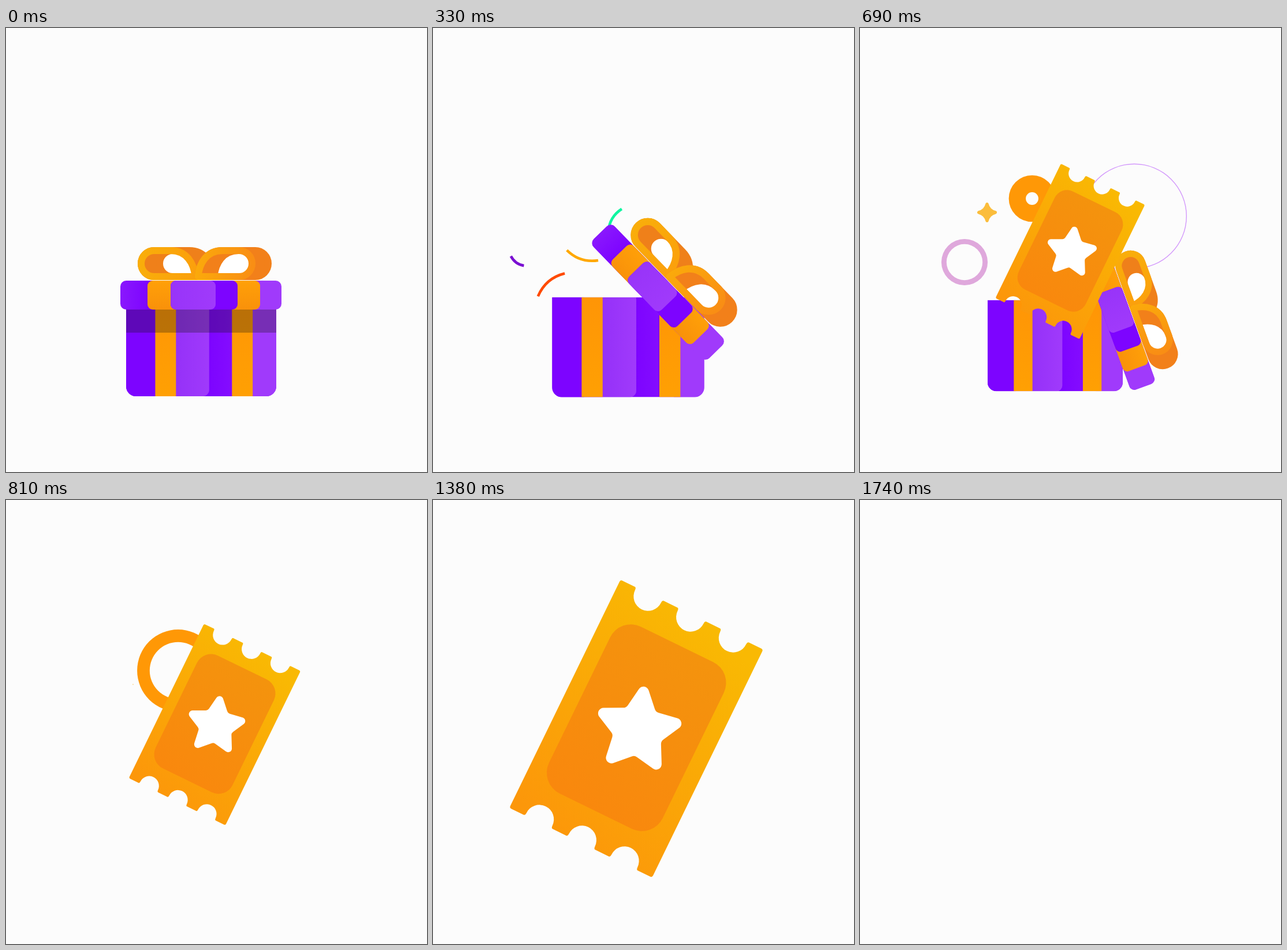
Animation, 729 px wide and 768 px high, one loop 1.8 s. Source, as an HTML page with a canvas:

```html
<!DOCTYPE html>
<html>
<head>
<meta charset="utf-8">
<title>Gift box</title>
<style>
html, body { margin: 0; width: 100%; height: 100%; overflow: hidden; background: #fcfcfc; }
canvas { display: block; }
</style>
</head>
<body>
<canvas id="stage" width="729" height="768"></canvas>
<script>
const ctx = document.getElementById('stage').getContext('2d');
const LOOP = 1800, STEP = 30, TAU = Math.PI * 2, CENTER = 337.5;
const BG = '#fcfcfc', DARK = '#7d04ff', LIGHT = '#a03afb';
const phase = (t, start, span) => Math.max(0, Math.min(1, (t - start) / span));
const easeOut = (p, n = 2) => 1 - Math.pow(1 - p, n);
const rad = deg => deg * Math.PI / 180;

function gradient(x0, y0, x1, y1, a, b) {
  const g = ctx.createLinearGradient(x0, y0, x1, y1);
  g.addColorStop(0, a);
  g.addColorStop(1, b);
  return g;
}

function round(x0, y0, x1, y1, r, fill) {
  ctx.beginPath();
  ctx.roundRect(x0, y0, x1 - x0, y1 - y0, r);
  ctx.fillStyle = fill;
  ctx.fill();
}

// The box stretches while the lid flies, then squashes as it lands
function drawBody(t) {
  const stretch = t < 600 ? Math.sin(t / 300 * Math.PI) : 0;
  const w = 260 - 11 * stretch, h = 175 + 7 * stretch;
  const x0 = CENTER + .5 - w / 2, x1 = x0 + w;
  const y1 = 637 + 5 * Math.max(0, -stretch), y0 = y1 - h;
  const px = f => x0 + w * f;
  ctx.save();
  ctx.beginPath();
  ctx.roundRect(x0, y0, w, h, [0, 0, 17, 17]);
  ctx.clip();
  round(x0, y0, x1, y1, 0, gradient(px(.55), 0, px(.7), 0, DARK, '#840cff'));
  round(x0, y0, px(.553), y1, [0, 0, 11, 0], gradient(px(.33), 0, px(.553), 0, '#9531f8', LIGHT));
  round(x0, y0, px(.21), y1, 0, DARK);
  round(px(.8), y0, x1, y1, 0, LIGHT);
  const strap = gradient(0, y0, 0, y1, '#ff9506', '#ffa003');
  for (const f of [.194, .705]) round(px(f), y0, px(f + .138), y1, 0, strap);
  round(x0, y0, x1, y0 + 65 * (1 - phase(t, 0, 315)), 0, 'rgba(20,20,12,.29)');
  ctx.restore();
}

// One ribbon loop; dir = 1 curls left, -1 curls right
function loopPath(x, dir) {
  const p = new Path2D();
  p.moveTo(x, -32);
  p.lineTo(x - 71 * dir, -32);
  p.arc(x - 71 * dir, -54.5, 22.5, Math.PI / 2, -Math.PI / 2, dir < 0);
  p.lineTo(x - 42 * dir, -77);
  p.bezierCurveTo(x - 15 * dir, -77, x - 2 * dir, -55, x, -32);
  p.closePath();
  return p;
}

function drawLoop(x, dir, shift, back, front) {
  const face = loopPath(x, dir), rear = new Path2D();
  rear.addPath(face, new DOMMatrix([1, 0, 0, 1, shift, 0]));
  ctx.lineWidth = 12;
  ctx.lineJoin = 'round';
  ctx.fillStyle = ctx.strokeStyle = back;
  for (const p of [rear, face]) { ctx.fill(p); ctx.stroke(p); }
  ctx.save();
  ctx.clip(face);
  ctx.fillStyle = '#fff';
  ctx.fill(rear);
  ctx.stroke(rear);
  ctx.restore();
  ctx.strokeStyle = front;
  ctx.stroke(face);
}

// The lid hops up, tips over and ends leaning on the right side
function drawLid(t) {
  const p = phase(t, 0, 400), tip = Math.pow(p, 2.2), s = 1 + .03 * phase(t, 0, 150);
  ctx.save();
  ctx.translate(CENTER + 121.5 * tip * tip, 462 + 31.5 * tip - 49 * Math.sin(p * Math.PI));
  ctx.rotate(rad(70 * tip));
  ctx.scale(s, s);
  drawLoop(-10, 1, 32, '#ef801a', gradient(-110, 0, -10, 0, '#f9ae0a', '#fba00c'));
  drawLoop(-5, -1, 28, '#f2801a', gradient(-8, 0, 90, 0, '#fba90b', '#f98e14'));
  ctx.beginPath();
  ctx.roundRect(-139.5, -25, 279, 50, 10);
  ctx.clip();
  round(-140, -25, 0, 25, 0, gradient(-140, 0, -92, 0, '#8a18fd', DARK));
  round(0, -25, 140, 25, 0, LIGHT);
  const strap = gradient(0, -25, 0, 25, '#ffa008', '#f9910a');
  round(-92.5, -25, -40, 25, [9, 0, 0, 9], strap);
  round(50, -25, 102.5, 25, [0, 9, 9, 0], strap);
  round(-52.5, -25, 63.5, 25, 9, DARK);
  round(-52.5, -25, 25.5, 25, 9, gradient(-52, 0, 25, 0, '#9834f9', LIGHT));
  ctx.restore();
}

function drawBox(t) {
  const alpha = 1 - phase(t, 690, 120);
  if (!alpha) return;
  const s = 1 - .1 * Math.pow(Math.max(0, t - 570) / 120, 2);
  ctx.save();
  ctx.globalAlpha = alpha;
  ctx.translate(CENTER, 550);
  ctx.scale(s, s);
  ctx.translate(-CENTER, -550);
  drawBody(t);
  drawLid(t);
  ctx.restore();
}

// Short edge with three round notches; dir = -1 gives the opposite edge
function ticketEdge(dir) {
  const w = 137.5, h = 219.5, r = 25, depth = 5, c = 4;
  const line = (x, y) => ctx.lineTo(x * dir, y * dir);
  const curve = (cx, cy, x, y) => ctx.quadraticCurveTo(cx * dir, cy * dir, x * dir, y * dir);
  const turn = dir < 0 ? Math.PI : 0;
  line(-w, c - h);
  curve(-w, -h, c - w, -h);
  for (const m of [-82, 0, 82]) {
    line(m - r - 3, -h);
    curve(m - r, -h, m - r, depth - h);
    ctx.arc(m * dir, (depth - h) * dir, r, Math.PI + turn, turn, true);
    curve(m + r, -h, m + r + 3, -h);
  }
  line(w - c, -h);
  curve(w, -h, w, c - h);
}

function starPath(r, inner, corner) {
  const tips = Array.from({ length: 10 }, (_, i) => {
    const a = i * TAU / 10, d = i % 2 ? inner : r;
    return [d * Math.sin(a), -d * Math.cos(a)];
  });
  const [first, last] = [tips[0], tips[9]];
  ctx.beginPath();
  ctx.moveTo((first[0] + last[0]) / 2, (first[1] + last[1]) / 2);
  tips.forEach((p, i) => ctx.arcTo(...p, ...tips[(i + 1) % 10], corner));
  ctx.closePath();
}

function drawTicket(t) {
  const fade = Math.pow(phase(-t, -1710, 240), 2);
  const s = Math.min(1, .085 + .00073 * t) * easeOut(phase(t, 510, 150)) *
            (1 - .31 * easeOut(phase(t, 1560, 150)));
  if (!s || !fade) return;
  ctx.save();
  ctx.translate(381 - 29 * s, 373.5 + 22 * s);
  ctx.rotate(rad(26));
  ctx.scale(s, s);
  ctx.globalAlpha = fade;
  ctx.beginPath();
  ticketEdge(1);
  ticketEdge(-1);
  ctx.closePath();
  ctx.fillStyle = gradient(60, -210, -70, 220, '#f9b903', '#fc970a');
  ctx.fill();
  ctx.globalAlpha = Math.pow(fade, .6);
  round(-110, -162, 109, 159, 40, gradient(30, -160, -30, 160, '#f4930d', '#f9880d'));
  ctx.globalAlpha = 1;
  ctx.translate(4, 1);
  ctx.rotate(rad(-18));
  starPath(88, 44, 9.5);
  ctx.fillStyle = fade < 1 ? BG : '#fff';
  ctx.fill();
  ctx.restore();
}

// A disc that grows while its hole catches up
function drawRing(t, x, y, size, start, color) {
  const p = phase(t, start, 275);
  if (p === 0 || p === 1) return;
  const outer = size * easeOut(p, 3.4);
  ctx.beginPath();
  ctx.arc(x, y, outer, 0, TAU);
  ctx.arc(x, y, outer * Math.pow(p, .84), 0, TAU, true);
  ctx.globalAlpha = p > .9 ? .4 : 1;
  ctx.fillStyle = color;
  ctx.fill();
  ctx.globalAlpha = 1;
}

// Tail and head of each ribbon; all bend to the same side
const RIBBONS = {
  '#7a10d2': [42, 383, 5, 356],
  '#ff4a00': [82, 470, 158, 405],
  '#ffa800': [253, 368, 164, 339],
  '#0ff5a0': [282, 286, 320, 222],
  '#00dcfb': [378, 327, 438, 302],
  '#7a08f6': [541, 391, 558, 413]
};

function drawRibbons(t) {
  if (t < 270 || t >= 570) return;
  const k = easeOut(phase(t, 240, 240)), bend = .25;
  ctx.save();
  ctx.translate(CENTER, 455);
  ctx.scale(k, k);
  ctx.translate(-CENTER, -455);
  ctx.lineWidth = 7.5 * (1 - phase(t, 480, 90));
  for (const [color, [x0, y0, x1, y1]] of Object.entries(RIBBONS)) {
    ctx.beginPath();
    ctx.moveTo(x0, y0);
    ctx.quadraticCurveTo((x0 + x1) / 2 + (y1 - y0) * bend, (y0 + y1) / 2 - (x1 - x0) * bend, x1, y1);
    ctx.strokeStyle = color;
    ctx.stroke();
  }
  ctx.restore();
}

// Four-pointed star that swells and shrinks around its peak time
function sparkle(t, peak, color, x, y, r) {
  const d = Math.abs(t - peak) / (90 + 2 * r);
  if (d >= 1) return;
  const s = r * Math.cos(d * Math.PI / 2), tip = s * .84, c = s * .17;
  ctx.save();
  ctx.translate(x, y);
  ctx.beginPath();
  ctx.moveTo(0, -tip);
  for (let i = 0; i < 4; i++) {
    ctx.quadraticCurveTo(c, -c, tip, 0);
    ctx.rotate(TAU / 4);
  }
  ctx.closePath();
  ctx.lineJoin = 'round';
  ctx.lineWidth = s * .32;
  ctx.fillStyle = ctx.strokeStyle = color;
  ctx.fill();
  ctx.stroke();
  ctx.restore();
}

function drawSparkles(t) {
  const gold = '#fdaa10', white = '#fff';
  sparkle(t, 150, gold, 201, 520, 21);
  sparkle(t, 150, '#feb90c', 476, 509, 18.5);
  sparkle(t, 150, gold, 363.5, 460, 8);
  sparkle(t, 150, white, 222, 469, 6);
  sparkle(t, 150, white, 265, 548, 8);
  sparkle(t, 480, gold, 207, 304, 13.5);
  sparkle(t, 480, gold, 364, 460, 6.5);
  sparkle(t, 480, '#ffd9b4', 412, 375, 12);
  sparkle(t, 690, '#fbbd3c', 220, 319, 17);
  sparkle(t, 1050, '#fb9d0e', 201, 386, 16.5);
  sparkle(t, 1050, white, 265, 414, 4.5);
}

function draw(t) {
  ctx.fillStyle = BG;
  ctx.fillRect(0, 0, 729, 768);
  drawRibbons(t);
  drawRing(t, 475, 325.5, 91, 420, '#9400fb');
  drawRing(t, 298, 295, 73, 632, '#ff9806');
  drawRing(t, 181, 405, 40.5, 486, '#dfa8dc');
  drawBox(t);
  drawTicket(t);
  drawSparkles(t);
}

const begin = performance.now();
function tick() {
  const t = (performance.now() - begin) % LOOP;
  draw(Math.min(1740, Math.floor(t / STEP) * STEP));
  requestAnimationFrame(tick);
}
tick();
</script>
</body>
</html>
```
